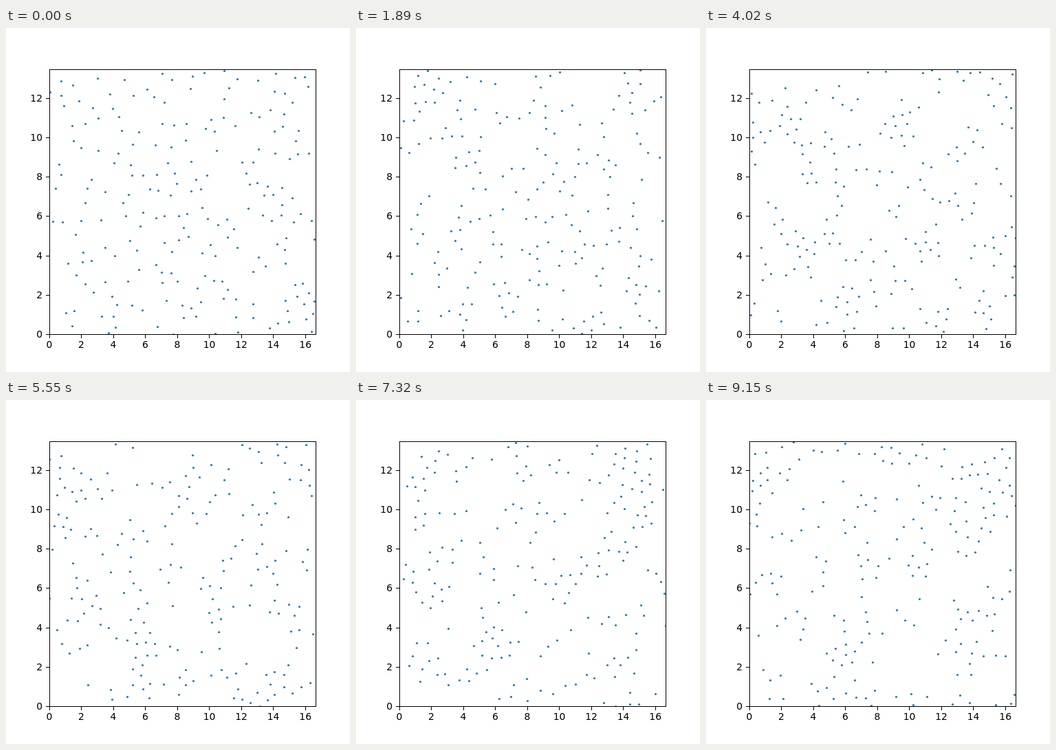
Write an HTML page with a canvas that moves like this. It is 500 px wide and 500 px high and loops after 9.18 s.

```html
<!DOCTYPE html>
<html lang="en">
<head>
<meta charset="utf-8">
<title>Particles in a periodic box</title>
<style>
html, body { margin: 0; width: 100%; height: 100%; overflow: hidden; background: #fff; }
canvas, svg { position: absolute; left: 0; top: 0; display: block; }
text { font: 13.889px "DejaVu Sans", sans-serif; fill: #000; }
</style>
</head>
<body>
<canvas id="dots" width="500" height="500"></canvas>
<svg id="axes" width="500" height="500" viewBox="0 0 500 500"></svg>
<script>
const FRAMES = 306, STEP = 30;
const COLS = 15, ROWS = 14, N = COLS * ROWS;
const GAP = 1.11, W = COLS * GAP, H = ROWS * GAP * Math.sqrt(3) / 2;
const LEFT = 62.5, RIGHT = 450, TOP = 60, BOTTOM = 445;
const px = x => LEFT + x * (RIGHT - LEFT) / W;
const py = y => BOTTOM - y * (BOTTOM - TOP) / H;

// Axes
const parts = [];
const bar = (x, y, w, h) => parts.push(`<rect x="${x}" y="${y}" width="${w}" height="${h}"/>`);
const label = (x, y, anchor, s) => parts.push(`<text x="${x}" y="${y}" text-anchor="${anchor}">${s}</text>`);
bar(63, 60, 388, 1);
bar(63, 445, 388, 1);
bar(63, 60, 1, 386);
bar(450, 60, 1, 386);
for (let v = 0; v <= 16; v += 2) {
  bar(Math.round(px(v)), 446, 1, 5);
  label(px(v) + 0.3, 465, "middle", v);
}
for (let v = 0; v <= 12; v += 2) {
  bar(58, Math.round(py(v)), 5, 1);
  label(53, Math.round(py(v)) + 5, "end", v);
}
document.getElementById("axes").innerHTML = parts.join("");

// Seeded random numbers
let seed = 20;
function rand() {
  seed = (seed + 0x6D2B79F5) | 0;
  let t = Math.imul(seed ^ (seed >>> 15), 1 | seed);
  t = (t + Math.imul(t ^ (t >>> 7), 61 | t)) ^ t;
  return ((t ^ (t >>> 14)) >>> 0) / 4294967296;
}
const gauss = () => Math.sqrt(-2 * Math.log(1 - rand())) * Math.cos(2 * Math.PI * rand());

// Lennard-Jones gas, started on a hexagonal lattice
const SPEED = 0.026, EPS = 0.001, SIGMA2 = 0.25, CUT2 = 1.6, DT = 0.25;
const make = () => new Float64Array(N);
const x = make(), y = make(), vx = make(), vy = make(), ax = make(), ay = make();
for (let i = 0; i < N; i++) {
  const row = Math.floor(i / COLS);
  x[i] = (i % COLS + (row % 2) / 2 + 0.25) * GAP;
  y[i] = (row + 0.5) * H / ROWS;
  vx[i] = gauss() * SPEED;
  vy[i] = gauss() * SPEED;
}
const mean = a => a.reduce((s, v) => s + v, 0) / N;
const mx = mean(vx), my = mean(vy);
for (let i = 0; i < N; i++) { vx[i] -= mx; vy[i] -= my; }

function forces() {
  ax.fill(0);
  ay.fill(0);
  for (let i = 0; i < N; i++) {
    for (let j = i + 1; j < N; j++) {
      let dx = x[i] - x[j], dy = y[i] - y[j];
      if (dx > W / 2) dx -= W; else if (dx < -W / 2) dx += W;
      if (dy > H / 2) dy -= H; else if (dy < -H / 2) dy += H;
      const r2 = dx * dx + dy * dy;
      if (r2 > CUT2) continue;
      const q = SIGMA2 / r2, s = q * q * q;
      const f = 24 * EPS * s * (2 * s - 1) / r2;
      ax[i] += f * dx; ay[i] += f * dy;
      ax[j] -= f * dx; ay[j] -= f * dy;
    }
  }
}

function kick() {
  for (let i = 0; i < N; i++) {
    vx[i] += ax[i] * DT / 2;
    vy[i] += ay[i] * DT / 2;
  }
}

function advance() {
  for (let k = 0; k < 4; k++) {
    kick();
    for (let i = 0; i < N; i++) {
      x[i] = (x[i] + vx[i] * DT + W) % W;
      y[i] = (y[i] + vy[i] * DT + H) % H;
    }
    forces();
    kick();
  }
  // Gentle thermostat
  let e = 0;
  for (let i = 0; i < N; i++) e += vx[i] * vx[i] + vy[i] * vy[i];
  const c = 1 + 0.05 * (SPEED / Math.sqrt(e / (2 * N)) - 1);
  for (let i = 0; i < N; i++) { vx[i] *= c; vy[i] *= c; }
}

forces();
for (let i = 0; i < 40; i++) advance();
const path = [];
for (let f = 0; f < FRAMES; f++) {
  path.push([x.slice(), y.slice()]);
  advance();
}

const ctx = document.getElementById("dots").getContext("2d");
ctx.beginPath();
ctx.rect(63, 60, 388, 386);
ctx.clip();
ctx.fillStyle = "#1f77b4";

let shown = -1;
function draw(f) {
  if (f === shown) return;
  shown = f;
  ctx.clearRect(0, 0, 500, 500);
  const [xs, ys] = path[f];
  for (let i = 0; i < N; i++) {
    ctx.beginPath();
    ctx.arc(Math.round(px(xs[i])) + 0.5, Math.round(py(ys[i])) + 0.5, 1.6, 0, 2 * Math.PI);
    ctx.fill();
  }
}

const start = performance.now();
function tick() {
  const t = Math.max(0, performance.now() - start);
  draw(Math.floor(t / STEP) % FRAMES);
  requestAnimationFrame(tick);
}
tick();
</script>
</body>
</html>
```
